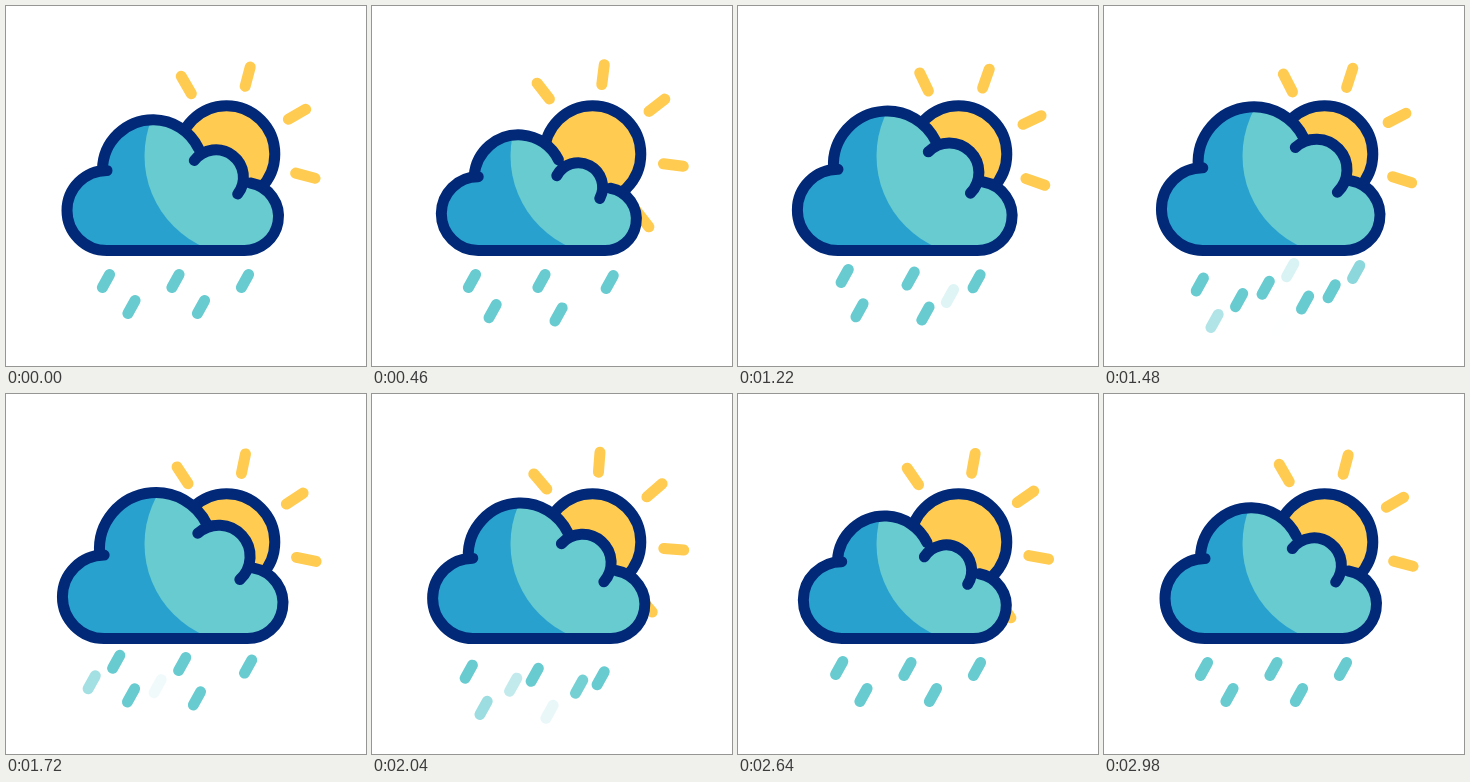
Write an HTML page with a canvas that moves like this. It is 360 px wide and 360 px high and loops after 3000 ms.

```html
<!DOCTYPE html>
<html>
<head>
<meta charset="utf-8">
<title>Sun and rain</title>
<style>
html, body { margin: 0; width: 100%; height: 100%; overflow: hidden; background: #fff; }
canvas { display: block; }
</style>
</head>
<body>
<canvas id="stage" width="360" height="360"></canvas>
<script>
const ctx = document.getElementById("stage").getContext("2d");
const NAVY = "#012978", BLUE = "#28a1cf", TEAL = "#67cbd0", YELLOW = "#ffcb50";
const PI = Math.PI, RAD = PI / 180, LOOP = 3000;

// Turning points: [time, base size, puff size] and [time, ray angle]
const CLOUD = [[0, 1, 1], [450, .922, .883], [840, 1, 1.039], [1780, 1.043, 1.118],
  [2400, .938, .902], [LOOP, 1, 1]];
const RAYS = [[0, 14.8], [900, 0], [1260, 20], [2180, 3.5], [LOOP, 14.8]];

// Each drop falls past its resting place once per pass
const SPEED = .042, STAGGER = 85, PASSES = [260, 1041, 1625, 2330];

// Ease in and out between neighbouring turning points
function at(keys, t) {
  const i = keys.findIndex(key => key[0] > t);
  const [t0, ...from] = keys[i - 1], [t1, ...to] = keys[i];
  const p = (1 - Math.cos(PI * (t - t0) / (t1 - t0))) / 2;
  return from.map((v, k) => v + (to[k] - v) * p);
}

function line(x0, y0, x1, y1, color) {
  ctx.strokeStyle = color;
  ctx.beginPath();
  ctx.moveTo(x0, y0);
  ctx.lineTo(x1, y1);
  ctx.stroke();
}

function sun(turn) {
  for (let k = 0; k < 8; k++) {
    const a = (turn + 45 * k) * RAD, x = Math.sin(a), y = -Math.cos(a);
    line(221 + 71 * x, 149 + 71 * y, 221 + 91 * x, 149 + 91 * y, YELLOW);
  }
  ctx.fillStyle = YELLOW;
  ctx.strokeStyle = NAVY;
  ctx.beginPath();
  ctx.arc(220.6, 148, 48.2, 0, 2 * PI);
  ctx.fill();
  ctx.stroke();
}

// Four arcs over a flat floor; broken leaves the ends of the arcs unjoined
function outline(s, u, broken) {
  const floor = 244.5, d = u - 1;
  const leftX = 168 - 67 * s, rightX = 168 + 70.5 * s;
  const r = 50.5 + 52 * d, topX = 168 - 71.5 * s + r, topY = 113.7 - 129.5 * d + r;
  const topStart = PI + Math.asin((topY - floor + 81 * s) / r);
  const hookX = 188.3 + 30 * d, hookY = 154.5 - 130 * d;
  const endX = 181.7 + 50 * s, endY = floor - 56.5 * s;
  const dx = hookX - endX, dy = hookY - endY, a = Math.atan2(dy, dx);
  const arc = (x, y, radius, from, to) => {
    if (broken) ctx.moveTo(x + radius * Math.cos(from), y + radius * Math.sin(from));
    ctx.arc(x, y, radius, from, to);
  };
  ctx.beginPath();
  arc(leftX, floor - 40 * s, 40 * s, PI / 2, 1.5 * PI);
  arc(topX, topY, r, topStart, -26 * RAD);
  arc((hookX + endX) / 2, (hookY + endY) / 2, Math.hypot(dx, dy) / 2, a, a + PI);
  arc(rightX, floor - 34 * s, 34 * s, -80 * RAD, PI / 2);
  ctx.lineTo(leftX, floor);
}

function cloud(s, u) {
  ctx.save();
  outline(s, u, false);
  ctx.fillStyle = BLUE;
  ctx.fill();
  ctx.clip();
  ctx.fillStyle = TEAL;
  ctx.beginPath();
  ctx.arc(238, 150, 99.5, 0, 2 * PI);
  ctx.fill();
  ctx.restore();
  outline(s, u, true);
  ctx.strokeStyle = NAVY;
  ctx.stroke();
}

function drop(x, y) {
  line(x + 3.6, y - 6.5, x - 3.6, y + 6.5, TEAL);
}

function rain(t) {
  for (let i = 0; i < 5; i++) {
    const homeX = i < 2 ? 195 - 69.5 * i : 239 - 69.5 * (i - 2);
    const homeY = i < 2 ? 301 : 275;
    PASSES.forEach((pass, n) => {
      let x = SPEED * (pass + i * STAGGER - t);
      // The first pass starts at rest and the last one ends there
      if (n === 0) x = Math.min(x, 0);
      if (n === PASSES.length - 1) x = Math.max(x, 0);
      ctx.globalAlpha = Math.max(0, Math.min(1, (18.5 - Math.abs(x)) / 7));
      drop(homeX + x, homeY - .8 * x + .009 * x * x);
    });
  }
  ctx.globalAlpha = 1;
}

function draw(now) {
  const t = now % LOOP;
  ctx.clearRect(0, 0, 360, 360);
  ctx.lineCap = ctx.lineJoin = "round";
  ctx.lineWidth = 11;
  sun(...at(RAYS, t));
  rain(t);
  cloud(...at(CLOUD, t));
}

const start = performance.now();
function tick() {
  draw(performance.now() - start);
  requestAnimationFrame(tick);
}
tick();
</script>
</body>
</html>
```
